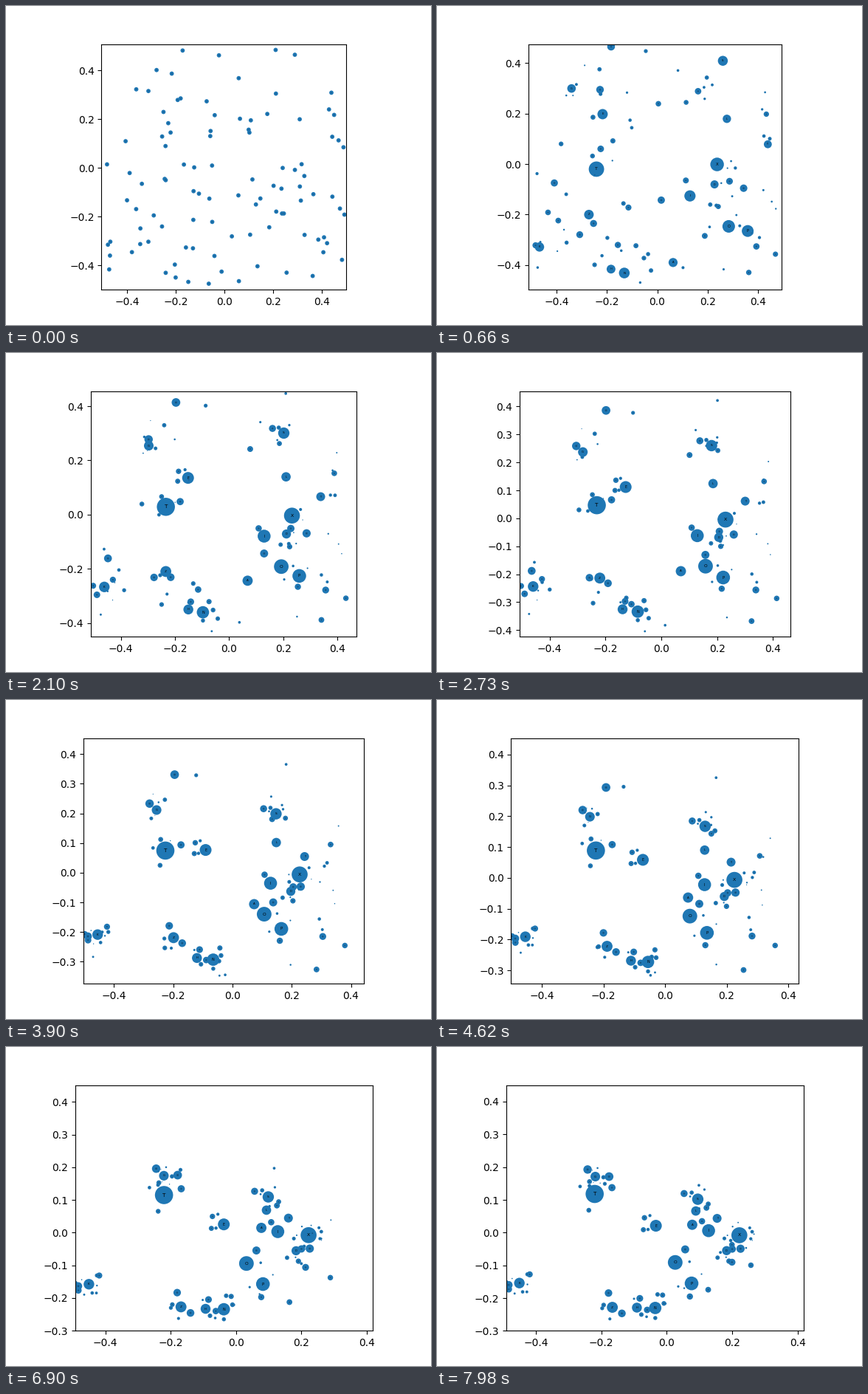
A matplotlib script for the animation above (8000 ms loop, 576 by 432 pixels).

```python
import numpy as np
import matplotlib.pyplot as plt
from matplotlib.animation import FuncAnimation

COUNT, FRAMES, INTERVAL, DPI = 100, 250, 32, 100
LOOP = FRAMES * INTERVAL / 1000
BLUE, DARK = "#1f77b4", "#14527f"
FIRST_R = 2.9            # common radius at the start, px
SPEED = 0.045            # drift of small bubbles, units per second
PX_PER_UNIT = 435
rng = np.random.default_rng(8)

# Large bubbles by rank: start and resting place
HUBS = np.array([
    (-.245, -.045, -.220, .118), (.240, .000, .222, -.008),
    (.330, -.275, .026, -.091), (.410, -.285, .076, -.155),
    (.130, -.150, .128, .006), (-.148, -.468, -.035, -.230),
    (-.250, .230, -.033, .021), (.290, .465, .095, .102),
    (-.290, -.195, -.166, -.228), (-.470, -.360, -.450, -.154),
    (.060, -.465, .078, .024), (-.200, -.450, -.091, -.229),
    (-.362, .323, -.218, .171), (.310, .200, .089, .066),
    (.235, -.085, .183, -.055), (.490, .085, .154, .0435),
])
LETTERS = "TXOPINESZKAHGLDY"
hub_from, hub_to = HUBS[:, :2], HUBS[:, 2:]

# Radius falls with the logarithm of the rank
rank = np.arange(1, COUNT + 1)
radius = 12.3 * (1 - np.log(rank) / np.log(110)) ** 0.8
hub_r, small_r = np.split(radius, [len(HUBS)])

# Each small bubble heads for a slot on the rim of the nearest large one
start = rng.uniform(-0.495, 0.495, (len(small_r), 2))
dist = np.linalg.norm(start[:, None] - hub_to, axis=2)
target = dist.argmin(axis=1)
angle = np.pi * (3 - np.sqrt(5)) * np.arange(len(start))
gap = (hub_r[target] + small_r + rng.uniform(1, 8, len(start))) / PX_PER_UNIT
slot = gap[:, None] * np.column_stack([np.cos(angle), np.sin(angle)])
travel = np.linalg.norm(hub_to[target] + slot - start, axis=1)


def place(t):
    ease = 1 - (1 - t / LOOP) ** 2
    hubs = hub_from + (hub_to - hub_from) * ease
    part = np.minimum(1, SPEED * t / travel)[:, None]
    return hubs, start + (hubs[target] + slot - start) * part


def view(t):
    def at(*values):
        return np.interp(t, [0, 1, 5.6, LOOP], values)
    x = at(-.505, -.515, -.496, -.4905), at(.501, .487, .419, .418)
    y = at(-.501, -.497, -.302, -.300), at(.508, .456, .452, .4497)
    return x, y


def area(r):
    return (2 * r * 72 / DPI) ** 2


fig, ax = plt.subplots(figsize=(5.76, 4.32), dpi=DPI)
ax.set_aspect("equal")
bubbles = ax.scatter(*np.zeros((2, COUNT)), c=BLUE, linewidths=0)
marks = ax.scatter(*np.zeros((2, len(start))), c=DARK, linewidths=0)
labels = [ax.text(0, 0, c, ha="center", va="center", clip_on=True)
          for c in LETTERS]


def draw(i):
    t = i * INTERVAL / 1000
    hubs, small = place(t)
    r = FIRST_R + (radius - FIRST_R) * (1 - np.exp(-t / 0.4))

    bubbles.set_offsets(np.vstack([hubs, small]))
    bubbles.set_sizes(area(r))
    marks.set_offsets(small)
    marks.set_sizes(area(0.25 * r[len(hubs):]))
    for label, pos, size in zip(labels, hubs, r):
        label.set_position(pos)
        label.set_fontsize(round(0.42 * size, 1))

    x, y = view(t)
    ax.set_xlim(x)
    ax.set_ylim(y)
    return [bubbles, marks, *labels]


anim = FuncAnimation(fig, draw, frames=FRAMES, interval=INTERVAL,
                     repeat=True, repeat_delay=0, blit=False)
plt.show()
```
